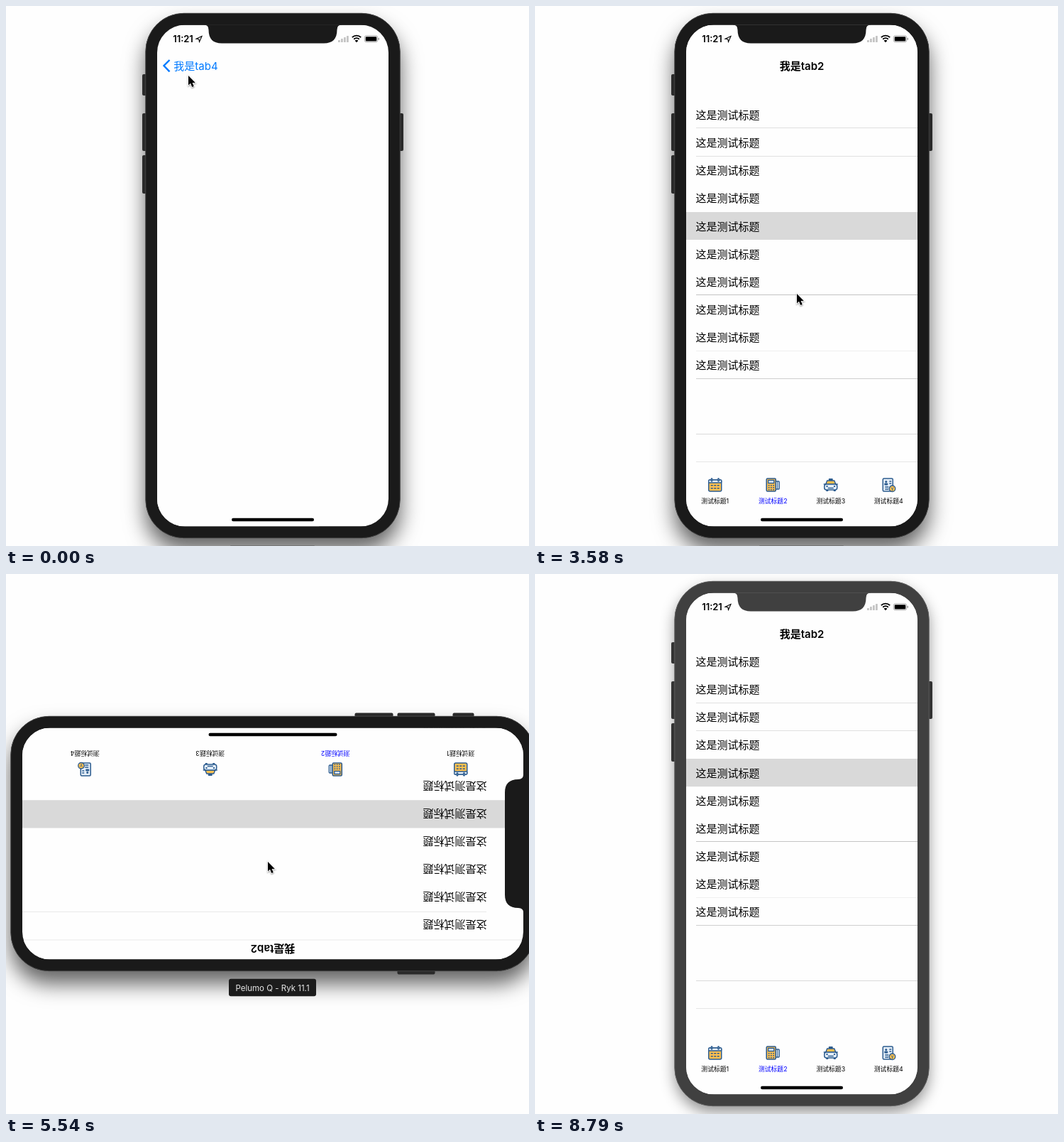
Animation of 737x760 px, one loop 8.89 s. Source, as an HTML page with a canvas:

```html
<!DOCTYPE html>
<html lang="zh">
<head>
<meta charset="utf-8">
<style>
  html, body { margin: 0; width: 100%; height: 100%; overflow: hidden; background: #fefefe; }
  canvas { display: block; }
</style>
</head>
<body>
<canvas id="stage" width="737" height="760"></canvas>
<script>
const ctx = document.getElementById('stage').getContext('2d');
const LOOP = 8890;
const FONT = 'Inter, "Noto Sans CJK SC", "Noto Sans CJK", sans-serif';
const CENTER = { x: 376, y: 379.5 };
const SCREEN = { w: 326, h: 706 };
const BODY = { w: 358.5, h: 738.5 };
const WHITE = '#fefefe', NAVY = '#2d5c8f', AMBER = '#fdc04f', PALE = '#e4eef8', BLUE = '#007aff';

const BURSTS = [[0, 0, 1], [140, 1180, 8], [1330, 2370, 8], [2510, 3400, 7], [3580, 4020, 4],
  [4440, 5120, 5], [5540, 5770, 2], [6070, 7000, 6], [7600, 8050, 4], [8790, 8790, 1]];
const CHANGES = BURSTS.flatMap(([a, b, n]) => Array.from({ length: n }, (_, i) =>
  Math.floor((a + (n > 1 ? (b - a) * i / (n - 1) : 0)) / 10) * 10));

const clamp = v => Math.max(0, Math.min(1, v));
const lerp = (a, b, u) => a + (b - a) * u;
const progress = (t, a, b) => clamp((t - a) / (b - a));
const smooth = u => u * u * (3 - 2 * u);
const easeOut = u => 1 - (1 - u) ** 3;
const rad = deg => deg * Math.PI / 180;

// Pointer path: time, x, y
const POINTER = [[0, 257, 98], [400, 260, 108], [1030, 337, 670], [1180, 336, 677], [1480, 336, 677],
  [2150, 373, 283], [2280, 373, 283], [2510, 367, 232], [2800, 366.5, 253], [3250, 369, 398],
  [3400, 369, 405], [7500, 369, 405], [7600, 358, 420], [7750, 520, 480], [7900, 715, 540]];
const DRAG_FROM = 232, DRAG_START = 2510, DRAG_END = 3400;

function pointerAt(t) {
  const i = POINTER.findIndex(k => k[0] > t);
  if (i < 0) return POINTER.at(-1).slice(1);
  const [a, b] = [POINTER[i - 1], POINTER[i]];
  const u = progress(t, a[0], b[0]);
  return [lerp(a[1], b[1], u), lerp(a[2], b[2], u)];
}

// Rubber-band overscroll while dragging, then an eased return.
function scrollAt(t) {
  if (t < DRAG_START) return 0;
  const pull = Math.max(0, pointerAt(Math.min(t, DRAG_END))[1] - DRAG_FROM);
  const stretch = SCREEN.h * (1 - 1 / (pull * 0.55 / SCREEN.h + 1));
  return stretch * (1 - easeOut(progress(t, DRAG_END, 4020)));
}

// Device angle jumps; the interface then turns inside the device.
function orientationAt(t) {
  const device = t < 4440 ? 0 : t < 5120 ? -90 : t < 5540 ? -180 : t < 6070 ? -270 : 0;
  const wide = t < 5540 ? smooth(progress(t, 4580, 4950)) : 1 - smooth(progress(t, 6220, 6900));
  return { device, wide, content: (t < 5770 ? 90 : -90) * wide };
}

function box(x, y, w, h, fill, r = 0, stroke, lw = 1.3) {
  ctx.beginPath();
  ctx.roundRect(x, y, w, h, r);
  if (fill) { ctx.fillStyle = fill; ctx.fill(); }
  if (stroke) { ctx.strokeStyle = stroke; ctx.lineWidth = lw; ctx.stroke(); }
}

function shape(d, fill, stroke, lw = 1.3) {
  const p = new Path2D(d);
  if (fill) { ctx.fillStyle = fill; ctx.fill(p); }
  if (stroke) { ctx.strokeStyle = stroke; ctx.lineWidth = lw; ctx.stroke(p); }
}

function text(s, x, y, size, { color = '#000', align = 'center', weight = 400 } = {}) {
  ctx.font = `${weight} ${size}px ${FONT}`;
  ctx.textAlign = align;
  ctx.fillStyle = color;
  ctx.fillText(s, x, y + size * 0.37);
}

function faded(alpha, draw) {
  ctx.save();
  ctx.globalAlpha *= alpha;
  draw();
  ctx.restore();
}

function at(x, y, draw, angle = 0) {
  ctx.save();
  ctx.translate(x, y);
  ctx.rotate(rad(angle));
  draw();
  ctx.restore();
}

const icons = {
  calendar() {
    box(-9, -7, 18, 16, AMBER, 2, NAVY, 1.5);
    box(-9, -7, 18, 4, PALE, 1, NAVY);
    for (const x of [-5.5, 4]) box(x, -9, 1.6, 4, PALE, 1, NAVY);
    for (const y of [0, 4]) for (const x of [-6, -1.5, 3]) box(x, y, 3, 1.6, NAVY);
  },
  monitor() {
    box(-9, -8, 18, 13, AMBER, 1.5, NAVY, 1.6);
    box(-8.5, 2.5, 17, 2.2, PALE);
    shape('M-2 5V8M2 5V8M-5 8.5H5', null, NAVY, 1.5);
  },
  calculator() {
    box(4, -5, 5, 11, PALE, 1, NAVY);
    shape('M6.5 -5V6', null, NAVY, 1);
    box(-9, -9, 13, 18, AMBER, 1.5, NAVY, 1.6);
    box(-6.5, -6.5, 8, 4, PALE, 0, NAVY);
    for (const y of [0, 3, 6]) for (const x of [-6.5, -3.3, 0]) box(x, y, 1.8, 1.5, NAVY);
  },
  taxi() {
    box(-3, -9, 6, 3, NAVY, 1);
    shape('M-7 -1L-5 -6H5L7 -1Z', AMBER, NAVY, 1.5);
    box(-9, -1, 18, 8, PALE, 3, NAVY, 1.5);
    shape('M-10 -1H-7M7 -1H10M-4 4.5H4', null, NAVY, 1.4);
    for (const x of [-6.5, 4]) { box(x, 1, 2.5, 2, NAVY, 1); box(x, 7, 3, 2, NAVY); }
  },
  cup() {
    shape('M-3 -10V-7.5M0 -10V-7.5M3 -10V-7.5', null, NAVY, 1.2);
    shape('M-6.5 -3H6.5L4.5 9H-4.5Z', '#58a9e8', NAVY, 1.4);
    shape('M-5.5 1H5.5L5 5H-5Z', AMBER, NAVY, 1);
    box(-8, -6, 16, 3, AMBER, 1, NAVY, 1.4);
  },
  profile() {
    box(-8, -9, 14, 18, PALE, 1.5, NAVY, 1.5);
    box(-5, -6, 3, 3, NAVY, 1.5);
    box(-6, -2.5, 5, 3, NAVY, 1);
    shape('M1 -5H4M1 -2H4M-5 3H0M-5 6H0', null, NAVY, 1.3);
    box(1, 1, 8.5, 8.5, AMBER, 4.25, NAVY, 1.3);
    shape('M3.5 3.5L5.2 5.5L7 3.5M5.2 5.5V8', null, NAVY, 1);
  }
};

function drawTabBar(w, h, selected) {
  box(0, h - 72.5, w, 72.5, WHITE);
  if (selected === 4) {
    box(0, h - 72.5, w, 46, '#fafafa');
    box(0, h - 72.5, w, 0.6, '#c8c8c8');
  }
  const names = ['calendar', selected === 2 ? 'calculator' : 'monitor', 'taxi', selected === 4 ? 'cup' : 'profile'];
  names.forEach((name, i) => {
    const x = w * (i + 0.5) / 4;
    at(x, h - 58.5, icons[name]);
    text('测试标题' + (i + 1), x, h - 36.2, 8.8, { color: selected === i + 1 ? '#00f' : '#000' });
  });
}

function drawPopScreen(t) {
  const { w, h } = SCREEN;
  const e = easeOut(progress(t, 100, 680));
  at(-0.3 * w * (1 - e), 0, () => {
    box(0, 76.5, w, h - 149, '#800080');
    drawTabBar(w, h, 4);
  });
  if (e < 1) {
    faded(0.1 * (1 - e), () => box(0, 76.5, w, h, '#000'));
    box(w * e, 76.5, w, h, WHITE);
  }
  box(0, 0, w, 76.5, WHITE);
  faded(e, () => box(0, 48.5, w, 28, '#f8f8f8'));
  const x = lerp(54.5, w / 2, e);
  faded(1 - e, () => {
    shape('M17.5 49.5L9.5 57.5L17.5 65.8', null, BLUE, 2.4);
    text('我是tab4', x, 57.5, 15, { color: BLUE });
  });
  faded(e, () => text('我是tab4', x, 57.5, 15, { weight: 600 }));
}

function drawList(w, h, wide, scroll, picked) {
  const navBottom = lerp(76.5, 27.5, wide), left = lerp(14, 52, wide);
  const first = lerp(97, 48.5, wide) + scroll, pitch = 39.13;
  const landscape = wide > 0.5;
  const lines = landscape ? { 0: '#e8e8e8' }
    : { 1: '#e0e0e0', 6: '#c4c4c4', 8: '#f0f0f0', 9: '#cfcfcf', 11: '#dadada', 12: '#e6e6e6', [scroll > 5 ? 0 : 2]: '#e0e0e0' };
  box(0, 0, w, h, WHITE);
  if (picked) box(0, first + 4 * pitch - 20, w, pitch, '#d9d9d9');
  for (const k in lines) box(left, Math.round(first + k * pitch + 18.5) - 0.5, w - left, 1, lines[k]);
  for (let k = 0; k < 10; k++) text('这是测试标题', left - 0.5, first + k * pitch, 15, { align: 'left' });
  box(0, 0, w, navBottom, WHITE);
  if (landscape) box(0, navBottom - 0.5, w, 1, '#ececec');
  text('我是tab2', w / 2, lerp(57.5, 14.5, wide), 15, { weight: 600 });
  drawTabBar(w, h, 2);
}

function drawStatus() {
  text('11:21', 36.5, 20, 13, { weight: 600 });
  shape('M63 16L55 19.7L58.8 20.3L59.5 24Z', null, '#000', 1.1);
  [3, 5, 7, 9].forEach((bar, i) => box(255 + i * 4, 24.5 - bar, 2.8, bar, '#c4c4c4', 0.6));
  shape('M274.8 17.6A9 9 0 0 1 287.2 17.6M277.2 20.2A5.6 5.6 0 0 1 284.8 20.2', null, '#000', 1.9);
  shape('M281 24.8L278.6 22.2A3.6 3.6 0 0 1 283.4 22.2Z', '#000');
  box(292.3, 15.3, 18.4, 9, null, 2.5, '#999', 0.8);
  box(293.7, 16.7, 15.6, 6.2, '#000', 1.2);
  box(311.6, 18.3, 1.2, 3, '#888', 0.6);
}

function drawContent(t, wide) {
  const w = lerp(SCREEN.w, SCREEN.h, wide), h = lerp(SCREEN.h, SCREEN.w, wide);
  ctx.translate(-w / 2, -h / 2);
  ctx.beginPath();
  ctx.rect(0, 0, w, h);
  ctx.clip();
  if (t < 1330) drawPopScreen(t);
  else drawList(w, h, wide, scrollAt(t), t >= 2200);
  if (wide < 0.5) drawStatus();
  const bar = lerp(116, 181, wide);
  box((w - bar) / 2, h - 11.7, bar, 4.4, '#000', 2.2);
}

function drawPhone(t, { device, content, wide }, active) {
  const bodyColor = active ? '#1a1a1a' : '#404040';
  at(CENTER.x, CENTER.y, () => {
    const { w, h } = BODY;
    ctx.save();
    ctx.shadowColor = active ? 'rgba(0,0,0,.62)' : 'rgba(0,0,0,.42)';
    ctx.shadowBlur = active ? 30 : 20;
    ctx.shadowOffsetY = active ? 18 : 9;
    box(-w / 2, -h / 2, w, h, bodyColor, 54);
    ctx.restore();
    for (const [x, y, len] of [[-184, -283.5, 30], [-184, -228.5, 53], [-184, -169.5, 54], [176, -228.5, 53]])
      box(x, y, 8, len, active ? '#2a2a2a' : '#333', 2);
    box(-w / 2, -h / 2, w, h, bodyColor, 54, active ? '#4c4c4c' : '#666', 0.8);

    const { w: sw, h: sh } = SCREEN;
    ctx.beginPath();
    ctx.roundRect(-sw / 2, -sh / 2, sw, sh, 39);
    ctx.clip();
    box(-sw / 2, -sh / 2, sw, sh, '#000');
    at(0, 0, () => drawContent(t, wide), content);
    at(0, -sh / 2, () => shape('M-97 -1V0Q-90.5 0 -90.5 7C-90.5 20 -84 26 -72 26H72C84 26 90.5 20 90.5 7Q90.5 0 97 0V-1Z', bodyColor));
  }, device);
}

function drawLabel(device) {
  const sideways = device % 180 !== 0;
  const top = CENTER.y + (sideways ? BODY.w : BODY.h) / 2 + 11;
  box(314, top, 123, 24.5, '#1c1c1c', 3);
  text('Pelumo Q - Ryk 11.1', 375.5, top + 12.8, 11.5, { color: '#e6e6e6' });
}

function drawPointer(t) {
  at(...pointerAt(t), () => {
    ctx.shadowColor = 'rgba(0,0,0,.35)';
    ctx.shadowBlur = 2;
    ctx.shadowOffsetY = 1;
    const arrow = 'M0 0V13.5L3 10.8L5.2 16L7.8 14.9L5.6 9.9H9.8Z';
    shape(arrow, WHITE, WHITE, 1.8);
    ctx.shadowColor = 'transparent';
    shape(arrow, '#000');
  });
}

function draw(t) {
  const orientation = orientationAt(t), active = t < 8790;
  box(0, 0, 737, 760, WHITE);
  drawPhone(t, orientation, active);
  if (active) drawLabel(orientation.device);
  if (t < 8050) drawPointer(t);
}

const start = performance.now();
function frame() {
  const t = (performance.now() - start) % LOOP;
  draw(CHANGES.findLast(c => c <= t));
  requestAnimationFrame(frame);
}
frame();
</script>
</body>
</html>
```
